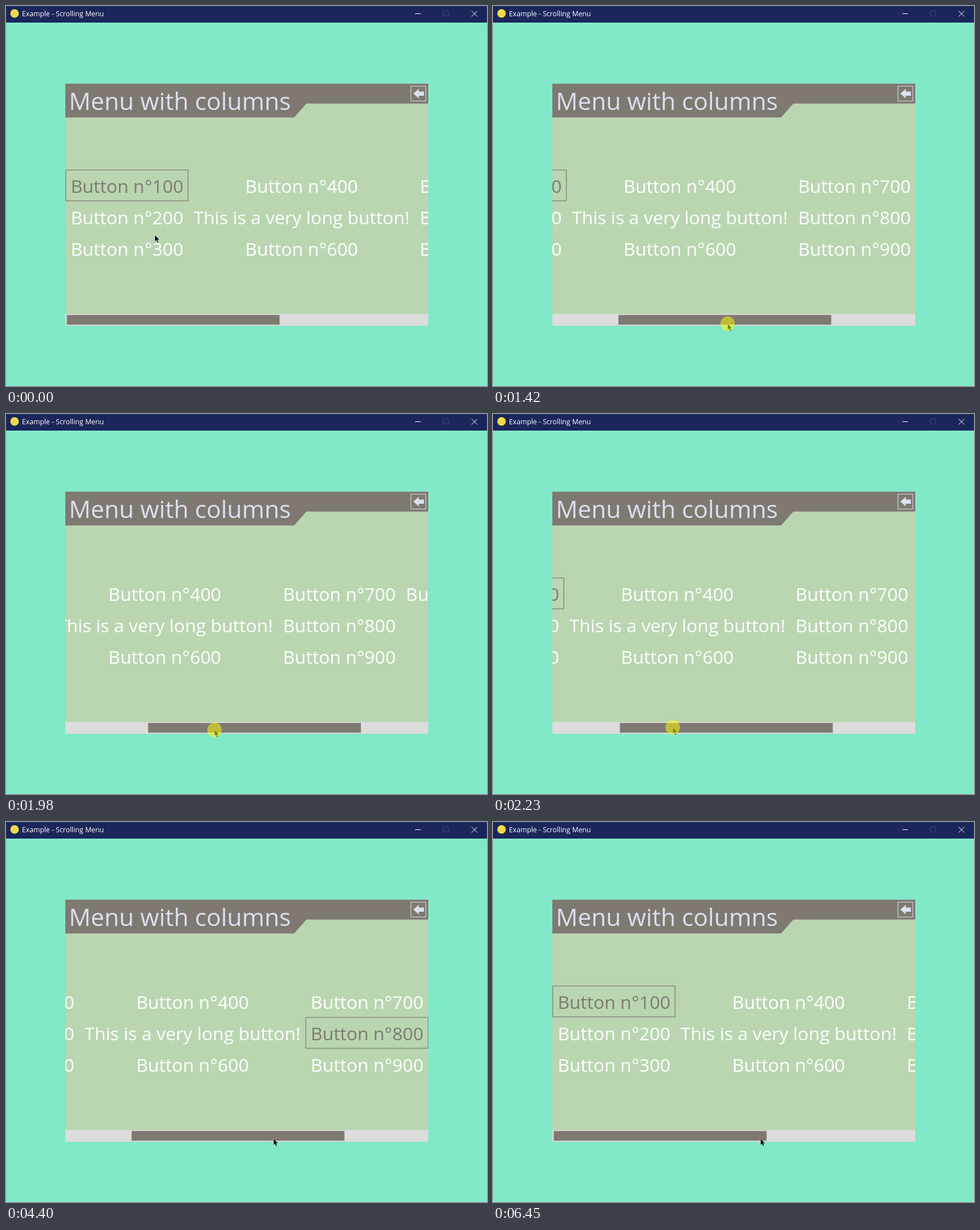
Recreate the animation shown at these times as an HTML page. Size 843x665 px, loop 7440 ms.

```html
<!DOCTYPE html>
<html lang="en">
<head>
<meta charset="utf-8">
<title>Scrolling Menu</title>
<style>
html, body { margin: 0; width: 100%; height: 100%; overflow: hidden; background: #81e8c8; }
svg { display: block; font-family: "Open Sans", sans-serif; }
.item { font-size: 31.85px; text-anchor: middle; fill: #fff; }
.item.on { fill: #7f7970; }
.line { fill: none; stroke: #fff; }
</style>
</head>
<body>
<svg width="843" height="665" viewBox="0 0 843 665">
  <defs><clipPath id="view"><rect x="104" y="195" width="636" height="344"/></clipPath></defs>
  <rect width="843" height="665" fill="#81e8c8"/>

  <rect width="843" height="29" fill="#1b265b"/>
  <circle cx="15" cy="13" r="7.5" fill="#f0d84a"/>
  <text x="28" y="17.6" font-size="12.25" fill="#fff">Example - Scrolling Menu</text>
  <path class="line" d="M717 13.5h10M816 8.5l10 10M826 8.5l-10 10"/>
  <rect class="line" x="766.5" y="8.5" width="9" height="9" style="stroke:#3d4674"/>

  <rect x="104" y="136" width="636" height="423.5" fill="#b9d6b1"/>
  <g clip-path="url(#view)"><g id="items">
    <rect id="frame" height="54" fill="none" stroke="#7f7970" stroke-width="1.2"/>
  </g></g>
  <path d="M104 136H740V170.7H526.5L505 195H104Z" fill="#7f7972"/>
  <text x="110.2" y="181.7" font-size="42.4" fill="#dcdfee">Menu with columns</text>
  <rect class="line" x="709.7" y="140.3" width="26" height="26" style="stroke:#dcdfee"/>
  <path d="M714 153.3L723.5 144.8V149.8H732.5V157H723.5V161.8Z" fill="#dcdfee"/>

  <rect x="104" y="539" width="636" height="20.5" fill="#dcdcdc"/>
  <rect id="thumb" y="540.7" width="373" height="17" fill="#7f7972"/>

  <path id="cursor" d="M0 0V11L2.5 8.7L4.4 13L6.3 12.2L4.5 8H8Z" stroke="#fff" stroke-opacity=".6" stroke-width=".7"/>
  <circle id="press" r="12.7" fill="#ff0" fill-opacity=".5"/>
</svg>
<script>
const LOOP = 7440, TICK = 60;
const LEFT = 104.5, RIGHT = 740.5, TOP = 287, ROW = 55, PAD = 17.8;
const $ = id => document.getElementById(id);
const set = (el, attrs) => Object.entries(attrs).forEach(([k, v]) => el.setAttribute(k, v));

// Key points of the pointer: time, x, y
const pointer = [
  [0, 261, 401], [240, 243, 470], [540, 291, 587], [720, 271.5, 553], [1140, 271.5, 553],
  [1500, 460, 557], [1740, 416, 557], [2220, 315, 548.5], [2340, 332, 538],
  [2760, 391, 377], [3120, 391, 377], [3180, 413, 394], [3540, 487, 545], [3720, 469, 554.5]
];

// Scrollbar drag: time, scroll
const drag = [[0, 0], [1080, 0], [1140, 6.5], [1560, 310], [1740, 284.5], [2220, 195], [2340, 121]];

// Selection: time, column, row
const picks = [
  [0, 0, 0], [3040, 1, 1], [4400, 2, 1], [4650, 3, 1],
  [5330, 3, 0], [6140, 2, 0], [6330, 1, 0], [6450, 0, 0]
];

function makeItem(name, row) {
  const text = document.createElementNS("http://www.w3.org/2000/svg", "text");
  set(text, { class: "item", y: TOP + 40 + row * ROW });
  text.textContent = name;
  $("items").append(text);
  return { text, width: text.getComputedTextLength() + PAD };
}

// Each column is as wide as its widest item, and items are centred in it.
let edge = LEFT;
const columns = [0, 1, 2, 3].map(c => {
  const names = c === 3 ? ["Button n°1000", "Back"]
    : [1, 2, 3].map(r => c === 1 && r === 2 ? "This is a very long button!" : `Button n°${c * 3 + r}00`);
  const items = names.map(makeItem);
  const width = Math.max(...items.map(i => i.width));
  for (const item of items) {
    item.x = edge + (width - item.width) / 2;
    item.text.setAttribute("x", edge + width / 2);
  }
  edge += width;
  return items;
});

const latest = (rows, t) => rows.filter(r => r[0] <= t).pop();

function ease(rows, t) {
  const a = latest(rows, t);
  const b = rows[rows.indexOf(a) + 1] || a;
  const p = b === a ? 0 : (t - a[0]) / (b[0] - a[0]);
  const s = p * p * (3 - 2 * p);
  return a.slice(1).map((v, i) => v + (b[i + 1] - v) * s);
}

// Every new selection scrolls just far enough to be fully visible.
function scrollAt(t, tick) {
  let [scroll] = ease(drag, tick);
  for (const [time, c, r] of picks.slice(1)) {
    if (time > t) break;
    const { x, width } = columns[c][r];
    scroll = Math.min(Math.max(scroll, x + width - RIGHT), x - LEFT);
  }
  return scroll;
}

function draw(t) {
  const tick = Math.floor(t / TICK) * TICK;
  const [x, y] = ease(pointer, tick);
  const [, col, row] = latest(picks, t);
  const scroll = scrollAt(t, tick);
  const chosen = columns[col][row];

  set($("items"), { transform: `translate(${-scroll})` });
  set($("thumb"), { x: 106.5 + scroll / 1.682 });
  set($("frame"), { x: chosen.x + 0.3, y: TOP + row * ROW, width: chosen.width - 1 });
  for (const item of columns.flat()) item.text.classList.toggle("on", item === chosen);

  const transform = `translate(${x} ${y})`;
  const down = (t >= 850 && t < 2410) || (t >= 2980 && t < 3040);
  set($("cursor"), { transform });
  set($("press"), { transform, visibility: down ? "visible" : "hidden" });
}

const begin = performance.now();
function loop() {
  draw((performance.now() - begin) % LOOP);
  requestAnimationFrame(loop);
}
loop();
</script>
</body>
</html>
```
